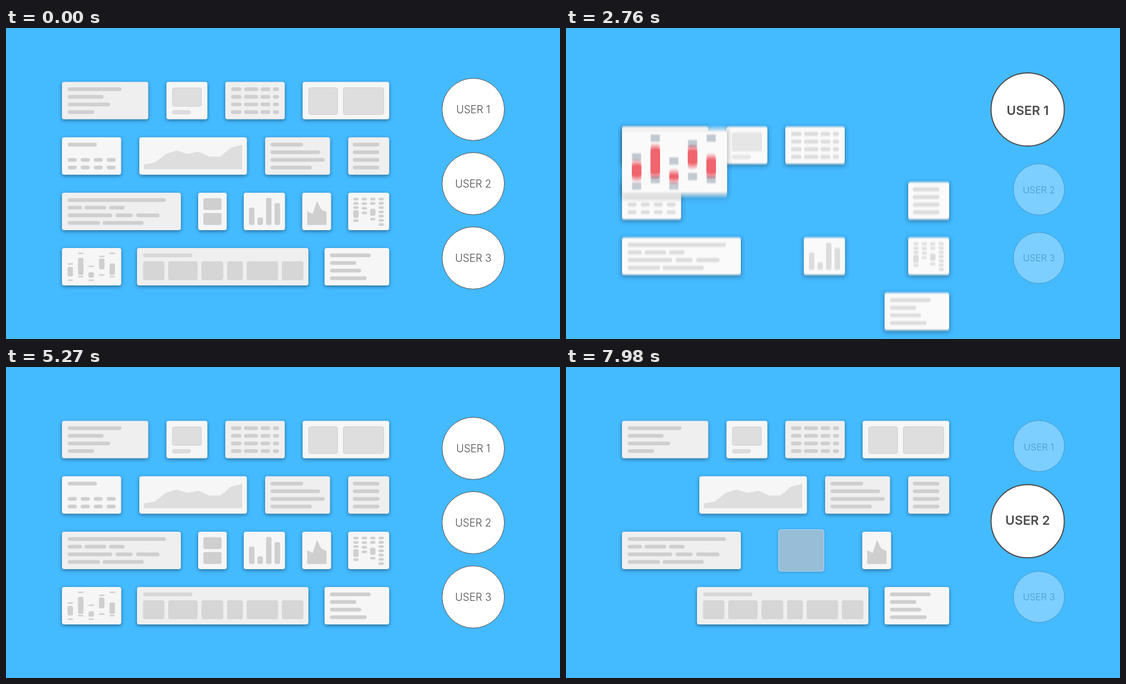
An HTML page with a canvas that plays this animation: 960x540 px, repeating every 8 s.

```html
<!DOCTYPE html>
<html lang="en">
<head>
<meta charset="utf-8">
<title>User layouts</title>
<style>
html, body { margin: 0; width: 100%; height: 100%; overflow: hidden; background: #44baff; }
canvas { display: block; width: 960px; height: 540px; }
</style>
</head>
<body>
<canvas id="stage" width="960" height="540"></canvas>
<script>
const W = 960, H = 540, LOOP = 8000, STEP = 50, CARD_H = 65;
const RED = [238, 29, 48], NAVY = [24, 46, 82], INK = [77, 77, 79], FADED = [71, 153, 202];
const GREY = [207, 207, 207], SOFT = '#dedede', EDGE = '#d1d1d1';
const ctx = document.getElementById('stage').getContext('2d');

const clamp = (v, lo, hi) => Math.min(hi, Math.max(lo, v));
const lerp = (a, b, p) => a + (b - a) * p;
const mix = (a, b, p) => a.map((v, i) => lerp(v, b[i], p));
const rgb = c => `rgb(${c.map(Math.round).join(',')})`;
const smooth = p => p * p * (3 - 2 * p);
const stepAt = (t, start, n) => clamp(Math.floor((t - start) / STEP) + 1, 0, n);

function makeLayer() {
  const c = document.createElement('canvas');
  c.width = W;
  c.height = H;
  return c.getContext('2d');
}
const sharp = makeLayer(), smear = makeLayer();

function box(g, x, y, w, h, r, fill, stroke) {
  g.beginPath();
  g.roundRect(x, y, w, h, r);
  g.fillStyle = fill;
  g.fill();
  if (stroke) {
    g.strokeStyle = stroke;
    g.lineWidth = 1;
    g.stroke();
  }
}

const line = (g, x, row, w, fill = rgb(GREY)) =>
  box(g, x, 9.5 + 13.25 * row, w, 6.5, 3.25, fill);

// Left-aligned text rows; the first turns navy when highlighted.
const textRows = (x, widths) => (g, h) =>
  widths.forEach((w, i) => line(g, x, i, w, rgb(mix(GREY, NAVY, i ? 0 : h))));

function area(g, points, fill) {
  g.beginPath();
  points.forEach(([x, y]) => g.lineTo(x, y));
  g.closePath();
  g.fillStyle = fill;
  g.fill();
}

function drawPhoto(g, h) {
  const tone = rgb(mix([222, 222, 222], GREY, h));
  box(g, 10.5, 10.5, 50, 32, 3, tone, EDGE);
  box(g, 10.5, 49.7, 31, 6, 3, tone, EDGE);
}

function drawGrid(g) {
  for (let r = 0; r < 4; r++)
    [[10, 18], [32.5, 24.5], [61, 17], [82.5, 10.5]].forEach(([x, w]) => line(g, x, r, w));
}

function drawPair(g) {
  box(g, 10.5, 10.2, 50, 46.5, 3, SOFT, EDGE);
  box(g, 70.5, 10.2, 70, 46.5, 3, SOFT, EDGE);
}

function drawKeys(g) {
  line(g, 10, 0, 50.5);
  for (const r of [2, 3]) for (let i = 0; i < 4; i++) line(g, 10 + 22.5 * i, r, 15.5);
}

function drawTrend(g) {
  const tops = [47, 44, 29, 23, 29, 25, 33.5, 33.5, 18, 13];
  area(g, [[8, 55.5], ...tops.map((y, i) => [8 + i * 18.9, y]), [178.1, 55.5]], SOFT);
}

function drawArticle(g, h) {
  line(g, 10, 0, 170, rgb(mix(GREY, NAVY, h)));
  [[[10, 24.5], [39, 37.5], [81.5, 27]],
   [[10, 77], [93, 29.5], [128.5, 40.5]],
   [[10, 56], [70.5, 71]]].forEach((row, i) => row.forEach(([x, w]) => line(g, x, i + 1, w)));
}

function drawStack(g) {
  box(g, 9, 9.5, 31.5, 20.5, 3, rgb(GREY));
  box(g, 9, 35.3, 31.5, 20.7, 3, rgb(GREY));
}

function drawBars(g) {
  [26, 43, 9, 18].forEach((y, i) => box(g, 9 + 14.8 * i, y, 9.5, 56 - y, 3, rgb(GREY)));
}

function drawPeak(g) {
  area(g, [[8.7, 56], [8.7, 32], [18, 37], [25.5, 14.5], [33, 29], [42, 33.5], [42, 56]], rgb(GREY));
}

function drawTable(g) {
  const pill = (col, y, h = 4.6) =>
    box(g, 8.7 + 14.6 * col, y - h / 2, 9.3, h, h > 5 ? 3 : 2.3, rgb(GREY));
  [11, 18.6, 25.8, 48.5].forEach(y => pill(0, y));
  pill(0, 37, 13.5);
  for (let i = 0; i < 4; i++) pill(1, 11 + 8 * i);
  [11, 18.6, 46].forEach(y => pill(2, y));
  pill(2, 34, 12.5);
  for (let i = 0; i < 7; i++) pill(3, 11 + 7.4 * i);
}

function drawCandles(g, h) {
  const body = rgb(mix(GREY, RED, h)), cap = rgb(mix(GREY, NAVY, h));
  [[27.7, 32.8, 49.4, 56.1], [9.3, 17, 46.7, 49.8], [31.7, 42, 51.6, 56.1],
   [14.6, 18.3, 37.1, 46.9], [9.3, 26.8, 46.7, 49.8]].forEach(([hi, top, bottom, lo], i) => {
    const x = 9.6 + 18.2 * i;
    box(g, x, top, 9.4, bottom - top, 2.8, body);
    for (const y of [hi, lo]) box(g, x, y - 1.25, 9.4, 2.5, 1.25, cap);
  });
}

function drawTiles(g) {
  line(g, 10.5, 0, 85.5, '#d7d7d7');
  [[10.5, 37], [54, 51], [111.5, 38], [156, 27.5], [190, 54.5], [251, 37.5]]
    .forEach(([x, w]) => box(g, x, 23, w, 33, 4, '#d6d6d6'));
}

const ROW_Y = [93.5, 189.8, 286, 382];
const RATE = [60, 27, 80, 38];

// out: user whose choice drops the card (3 = both). via, mid, to: poses [x, y, scaleX, scaleY].
const card = (row, x, w, tone, draw, more) =>
  ({ row, x, y: ROW_Y[row], w, tone: [tone, tone, tone], draw, out: 0, ...more });

const cards = [
  card(0, 278, 71, 246, drawPhoto,
    { via: [278, 306, 1], mid: [278, 370, 1], to: [182, 432, .64] }),
  card(0, 380, 103, 239, drawGrid,
    { via: [380, 306, 1], mid: [380, 370, 1], to: [314, 432, .64] }),
  card(0, 514, 150, 246, drawPair, { out: 1 }),
  card(0, 97, 149.5, 239, textRows(10, [93, 62, 73.5, 46]),
    { plain: true, via: [204, 246, .89, 1.05], mid: [97, 370, 1], to: [97, 370.5, .641] }),
  card(1, 97, 102.5, 246, drawKeys,
    { out: 2, via: [97, 364, 1], mid: [97, 466, 1], to: [95.7, 432, .64] }),
  card(1, 231, 186.5, 246, drawTrend, { out: 1 }),
  card(1, 449, 112.5, 239, textRows(9.3, [56.5, 86, 94, 71.5]), { out: 1 }),
  card(1, 593, 71, 239, textRows(8, [46, 46, 46, 46]),
    { star: true, via: [568, 300, 1.13], to: [386, 249, 1.26] }),
  card(2, 97, 206, 239, drawArticle,
    { star: true, via: [97, 354, 1.1, 1.16], to: [97, 249, 1.262] }),
  card(2, 333, 49.5, 246, drawStack, { out: 3 }),
  card(2, 412, 71.5, 246, drawBars,
    { out: 2, via: [412, 447, 1], mid: [412, 466, 1], to: [248.5, 432, .64] }),
  card(2, 513.3, 50, 246, drawPeak, { out: 1 }),
  card(2, 593, 71, 246, drawTable,
    { out: 2, via: [593, 415.7, 1], mid: [593, 466, 1], to: [400.5, 432, .64] }),
  card(3, 227, 297, 239, drawTiles, { out: 1 }),
  card(3, 552, 112, 246, textRows(9.3, [70.5, 45.5, 54, 63.5]),
    { star: true, late: true, via: [552, 501.5, 1], to: [504, 249, 1.26] }),
  card(3, 97, 102.7, 246, drawCandles, { out: 2, lead: true, to: [97, 62.3, 2.195] })
];

const pose = ([x, y, sx, sy = sx]) => [x, y, sx, sy];

function place(c, t) {
  const home = pose([c.x, c.y, 1]);
  const first = t < 5270;
  const n = first ? 4 : 5;
  const leave = stepAt(t, first ? 1850 : 7120, n);
  if (c.out & (first ? 1 : 2)) {
    if (leave === n) return null;
    home[0] -= leave && RATE[c.row] * leave ** 2.6;
    return { at: home, h: 0, blur: .35 };
  }
  if (!first) return { at: home, h: 0, blur: 0 };

  const lift = smooth(stepAt(t, 2660, 5) / 5);
  if (c.lead) return { at: mix(home, pose(c.to), lift), h: lift, blur: .12 };

  home[1] += 120 * lift;
  const sort = stepAt(t, 3360, 3);
  if (!sort) return { at: home, h: 0, blur: .12 };
  const mid = pose(c.mid || c.to);
  const settle = smooth(stepAt(t, 3790, 4) / 4);
  const at = settle ? mix(mid, pose(c.to), settle) : mix(pose(c.via), mid, [0, .7, 1][sort - 1]);
  const h = sort > 1 ? 1 : c.late || c.plain ? 0 : c.star ? .75 : .5;
  return { at, h, blur: .12 };
}

function drawCard(g, c, { at: [x, y, sx, sy], h }) {
  g.save();
  g.translate(x, y);
  g.shadowColor = 'rgba(0,0,0,.42)';
  g.shadowBlur = 6;
  g.shadowOffsetY = 2;
  const tone = rgb(mix(c.tone, c.star ? [255, 255, 255] : [246, 246, 246], h));
  box(g, 0, 0, c.w * sx, CARD_H * sy, c.star ? lerp(4, 5.5, h) : 4, tone);
  g.shadowColor = 'transparent';
  if (c.star && h) {
    g.globalAlpha = h;
    g.strokeStyle = '#14233f';
    g.lineWidth = 1.3;
    g.stroke();
    g.globalAlpha = 1;
  }
  g.scale(sx, sy);
  c.draw(g, c.plain ? 0 : h);
  g.restore();
}

function drawMoving(c, now, dx, dy) {
  const copies = 10;
  sharp.clearRect(0, 0, W, H);
  smear.clearRect(0, 0, W, H);
  drawCard(sharp, c, now);
  smear.globalCompositeOperation = 'lighter';
  smear.globalAlpha = 1 / copies;
  for (let i = 0; i < copies; i++) {
    const k = i / (copies - 1) - .5;
    smear.drawImage(sharp.canvas, dx * k, dy * k);
  }
  ctx.drawImage(smear.canvas, 0, 0);
}

function renderCard(c, t) {
  const now = place(c, t);
  if (!now) return;
  const before = place(c, t < 5270 ? t - STEP : Math.max(5270, t - STEP)) || now;
  const [dx, dy] = [0, 1].map(i => clamp((now.at[i] - before.at[i]) * now.blur, -90, 90));
  if (Math.hypot(dx, dy) > 1.5) drawMoving(c, now, dx, dy);
  else drawCard(ctx, c, now);
}

// Circle poses: x, y, radius, text y, text size, weight, outline, fade.
const idle = i => [809.7, 141.3 + 129 * i, 54, 141.5 + 128.8 * i, 18, 300, 1, 0];
const picked = (y, textY) => [800, y, 63.5, textY, 22, 600, 2, 0];
const faded = (y, textY) => [819.5, y, 44.4, textY, 16, 300, 1, 1];
const choices = [
  [picked(141.5, 143), faded(280.2, 281), faded(399.2, 399.5)],
  [faded(137.2, 139.5), picked(267.8, 266), faded(399.2, 399.5)]
];

function drawUser(i, t) {
  const first = t < 5270;
  const p = smooth(stepAt(t, first ? 1000 : 6270, 3) / 3);
  const [x, y, r, textY, size, weight, outline, fade] = mix(idle(i), choices[first ? 0 : 1][i], p);
  const ink = rgb(mix(INK, FADED, fade));
  ctx.beginPath();
  ctx.arc(x, y, r, 0, Math.PI * 2);
  ctx.fillStyle = `rgba(255,255,255,${lerp(1, .3, fade)})`;
  ctx.fill();
  ctx.strokeStyle = ink;
  ctx.lineWidth = outline;
  ctx.stroke();
  ctx.font = `${Math.round(weight / 100) * 100} ${size}px Inter, Roboto, sans-serif`;
  ctx.textAlign = 'center';
  ctx.fillStyle = ink;
  ctx.fillText(`USER ${i + 1}`, x, textY + size * .364);
}

function drawSlot() {
  ctx.save();
  ctx.shadowColor = 'rgba(0,0,0,.25)';
  ctx.shadowBlur = 5;
  ctx.shadowOffsetY = 1;
  box(ctx, 368.5, 282.3, 78.5, 72.5, 4, '#97bdd7');
  ctx.shadowColor = 'transparent';
  ctx.strokeStyle = '#b9dcf0';
  ctx.lineWidth = 1;
  ctx.stroke();
  ctx.restore();
}

function render(t) {
  ctx.fillStyle = '#44baff';
  ctx.fillRect(0, 0, W, H);
  cards.forEach(c => renderCard(c, t));
  if (t >= 7980) drawSlot();
  for (let i = 0; i < 3; i++) drawUser(i, t);
}

const start = performance.now();
function tick() {
  render((performance.now() - start) % LOOP);
  requestAnimationFrame(tick);
}
tick();
</script>
</body>
</html>
```
